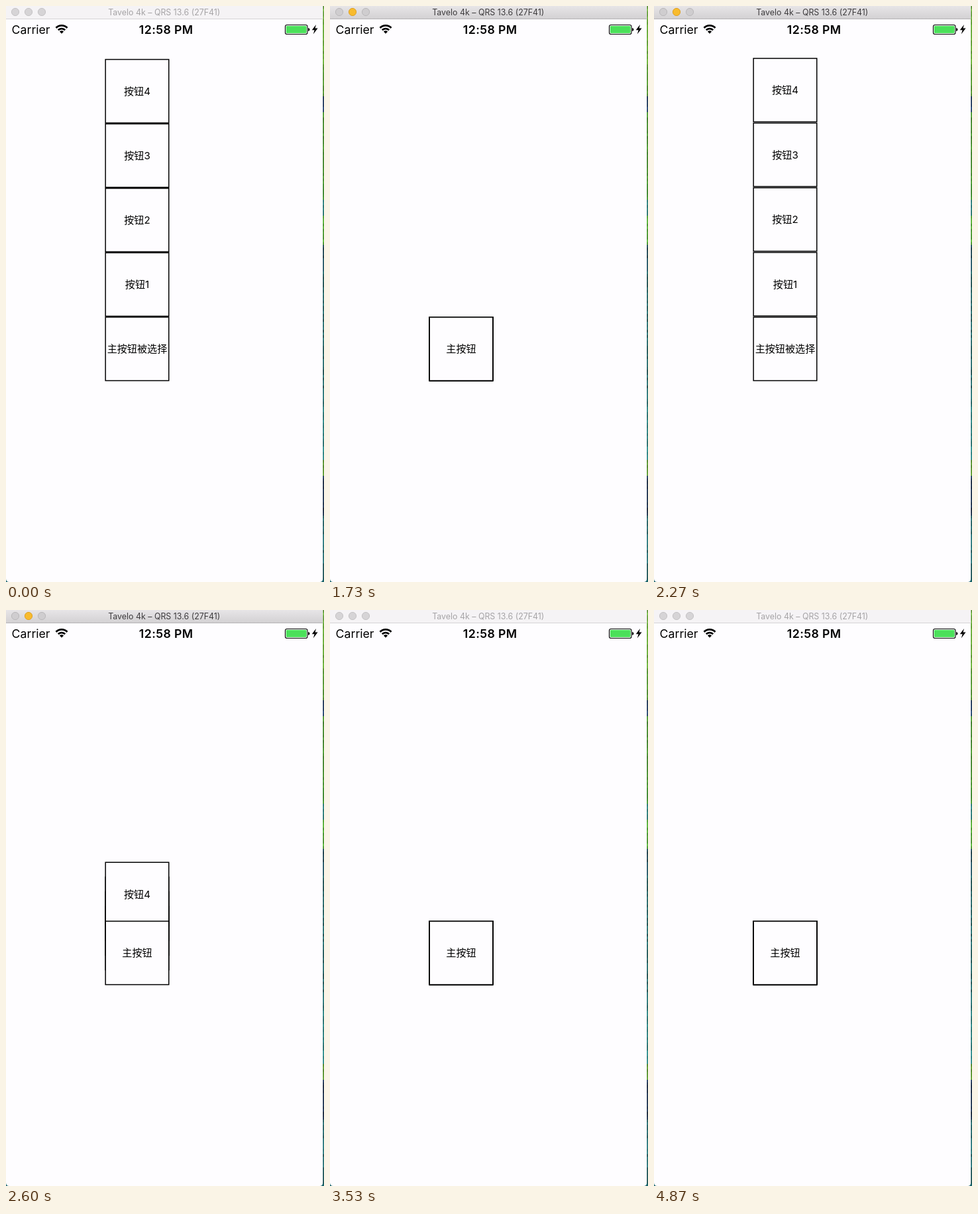
Write an HTML page that moves like this. It is 480x868 px and loops after 4990 ms.

```html
<!DOCTYPE html>
<html lang="zh-CN">
<head>
<meta charset="utf-8">
<title>Expanding menu</title>
<style>
  html, body { margin: 0; width: 100%; height: 100%; overflow: hidden; background: #14606a; }
  svg { display: block; width: 480px; height: 868px; }
  text { font-family: Inter, "Noto Sans CJK SC", "Noto Sans CJK", sans-serif; }
  .btn rect { fill: #fefdff; stroke: #000; stroke-width: 1.5; }
  .btn text { font-size: 15.1px; text-anchor: middle; }
  .bar { fill: #f5f3f5; }
  .edge { fill: #d5d3d5; }
  .light { fill: #d6d4d6; stroke: #c5c3c5; }
  .title { fill: #a6a4a6; font-size: 12.4px; text-anchor: middle; }
  .active .bar { fill: url(#barFill); }
  .active .edge { fill: #b5b3b5; }
  .active .light { fill: #cfcdcf; stroke: #bab8ba; }
  .active .mini { fill: #f8bb2e; stroke: #dda127; }
  .active .title { fill: #3d3b3d; }
</style>
</head>
<body>
<svg viewBox="0 0 480 868">
  <defs>
    <linearGradient id="barFill" x2="0" y2="1">
      <stop stop-color="#e7e5e7"/>
      <stop offset="1" stop-color="#d2d0d2"/>
    </linearGradient>
  </defs>

  <rect width="480" height="868" fill="#14606a"/>
  <g id="wall"></g>
  <path d="M0 0H478.3V863Q478.3 868 473.3 868H5Q0 868 0 863Z" fill="#fefdff"/>

  <g id="menu"></g>

  <g id="status">
    <text x="8.6" y="42" font-size="17.7">Carrier</text>
    <g fill="none" stroke="#000" stroke-width="2.8">
      <path d="M75.5 33A12 12 0 0 1 92.5 33"/>
      <path d="M78.8 36.3A7.4 7.4 0 0 1 89.2 36.3"/>
    </g>
    <path d="M84 41.8L80.9 38.5A4.4 4.4 0 0 1 87.1 38.5Z"/>
    <text x="241.7" y="42" font-size="17.7" font-weight="600" letter-spacing=".4" text-anchor="middle">12:58 PM</text>
    <rect x="421.5" y="28.5" width="33.5" height="14" rx="2.6" fill="#fefdff" stroke="#000" stroke-width="1.1"/>
    <rect x="422.9" y="29.9" width="30.7" height="11.2" rx="1.4" fill="#4be05a"/>
    <path d="M456.2 33Q458.4 33.4 458.4 35.5T456.2 38Z"/>
    <path d="M468 28L461.8 36.2H465.6L463.8 42.4L470.6 33.6H466.6Z"/>
  </g>

  <g id="window">
    <rect class="bar" width="478.3" height="20"/>
    <rect class="edge" y="19" width="478.3" height="1"/>
    <circle class="light" cx="14" cy="9" r="5.6"/>
    <circle class="light mini" cx="34" cy="9" r="5.6"/>
    <circle class="light" cx="54" cy="9" r="5.6"/>
    <text class="title" x="238.8" y="14">Tavelo 4k – QRS 13.6 (27F41)</text>
  </g>
</svg>

<script>
const LOOP = 4990, STEP = 200 / 3;
const CLOSE_1 = 875, OPEN = 1882, CLOSE_2 = 2534;
const ACTIVE_FROM = 860, ACTIVE_TO = 3260;
const SIZE = 97.1, LEFT = 149.4, TOP = 468.2;
const $ = id => document.getElementById(id);

function add(parent, name, attrs, text = '') {
  const el = document.createElementNS('http://www.w3.org/2000/svg', name);
  for (const key in attrs) el.setAttribute(key, attrs[key]);
  el.textContent = text;
  return parent.appendChild(el);
}

function makeButton(label) {
  const g = add($('menu'), 'g', { class: 'btn' });
  add(g, 'rect', { x: LEFT + .75, y: TOP + .75, width: SIZE - 1.5, height: SIZE - 1.5 });
  const text = add(g, 'text', { x: LEFT + SIZE / 2, y: TOP + 54 }, label);
  return { g, text };
}

// Desktop sliver at the right: colour bands with seeded grain
function paintWall() {
  const bands = [[0, 95, 38], [90, 100, 32], [135, 215, 22], [160, 105, 32], [265, 110, 30],
    [290, 178, 28], [315, 105, 38], [360, 195, 18], [400, 182, 22], [600, 180, 27],
    [682, 95, 34], [706, 215, 16], [765, 184, 24]];
  let seed = 7;
  for (let y = 0; y < 868; y += 4) {
    seed = seed * 16807 % 2147483647;
    const [, hue, light] = bands.filter(b => b[0] <= y).pop();
    const l = light + (seed / 2147483647 - .5) * 12;
    add($('wall'), 'rect', { x: 478, y, width: 2, height: 4, fill: `hsl(${hue} 62% ${l}%)` });
  }
}

// Remaining distance of a half-damped spring that settles in 0.5 s
function spring(ms) {
  if (ms <= 0) return 1;
  if (ms >= 500) return 0;
  const t = ms / 1000, w = 23.93;
  return Math.exp(-13.82 * t) * (Math.cos(w * t) + .577 * Math.sin(w * t));
}

function spread(t) {
  if (t < OPEN) return spring(t - CLOSE_1);
  if (t < CLOSE_2) return 1 - spring(t - OPEN);
  return spring(t - CLOSE_2);
}

paintWall();
const items = [1, 2, 3, 4].map(n => makeButton('按钮' + n));
const main = makeButton('主按钮被选择');
const start = performance.now();

function draw() {
  const now = (performance.now() - start) % LOOP;
  // Motion advances at 15 pictures per second
  const t = Math.floor((now + 3.4) / STEP) * STEP;
  const gap = SIZE * spread(t);
  items.forEach(({ g }, i) => g.setAttribute('transform', `translate(0 ${-(i + 1) * gap})`));
  const selected = t < CLOSE_1 - 10 || (t >= OPEN && t < CLOSE_2);
  main.text.textContent = selected ? '主按钮被选择' : '主按钮';
  $('window').classList.toggle('active', t >= ACTIVE_FROM && t < ACTIVE_TO);
  requestAnimationFrame(draw);
}
draw();
</script>
</body>
</html>
```
